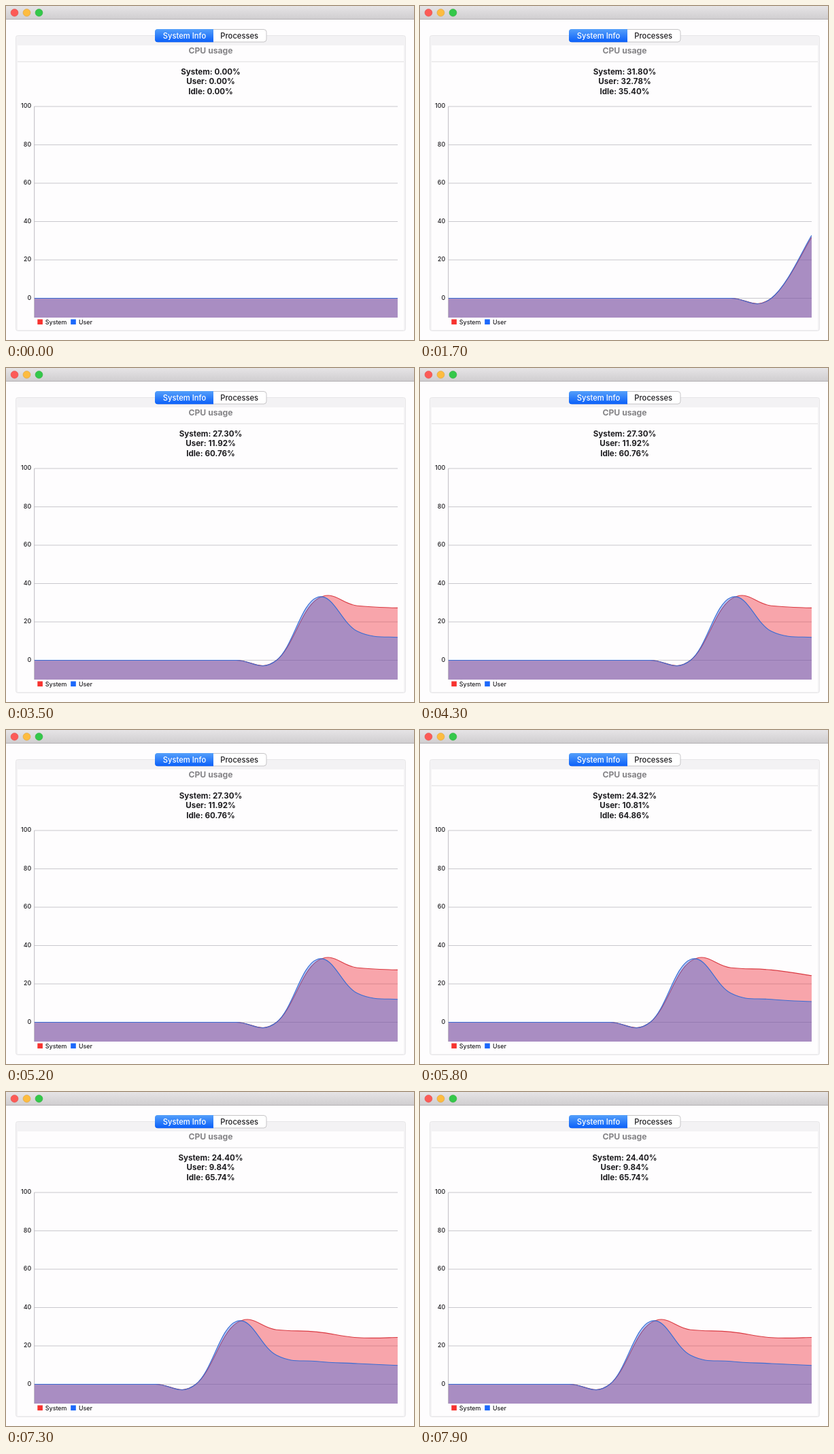
Write an HTML page that moves like this. It is 600 px wide and 492 px high and loops after 8 s.

```html
<!DOCTYPE html>
<html lang="en">
<head>
<meta charset="utf-8">
<title>CPU usage</title>
<style>
  html, body { margin: 0; width: 100%; height: 100%; overflow: hidden; background: #fefdfe; }
  svg { display: block; width: 100%; height: 100%; font-family: Inter, "Open Sans", sans-serif; }
  .mid { text-anchor: middle; }
  .tab { font-size: 11.2px; font-weight: 500; }
  .head { font-size: 12.2px; font-weight: 700; fill: #858487; }
  .stat { font-size: 11.6px; font-weight: 700; fill: #1e1d20; }
  .small { font-size: 8.9px; font-weight: 500; fill: #1e1d20; }
  .end { text-anchor: end; }
</style>
</head>
<body>
<svg viewBox="0 0 600 492">
  <defs>
    <linearGradient id="bar" x2="0" y2="1">
      <stop stop-color="#e6e4e6"/><stop offset="1" stop-color="#d0ced0"/>
    </linearGradient>
    <linearGradient id="on" x2="0" y2="1">
      <stop stop-color="#55a0fa"/><stop offset="1" stop-color="#0a5ff9"/>
    </linearGradient>
    <clipPath id="plot"><rect x="41.5" y="147" width="534.5" height="312"/></clipPath>
  </defs>

  <rect width="600" height="492" fill="#fefdfe"/>
  <rect width="600" height="19" fill="url(#bar)"/>
  <rect y="19" width="600" height="1" fill="#b3b1b3"/>
  <g stroke-width=".6">
    <circle cx="12.5" cy="9.8" r="5.4" fill="#fc5b57" stroke="#df4744"/>
    <circle cx="30.5" cy="9.8" r="5.4" fill="#fdbc40" stroke="#dd9f34"/>
    <circle cx="48.5" cy="9.8" r="5.4" fill="#34c84a" stroke="#27aa35"/>
  </g>

  <rect x="14.5" y="43.5" width="573" height="435" rx="3" fill="#f3f2f4" stroke="#e7e6e8"/>
  <rect x="17" y="58" width="568" height="419" fill="#fefdfe"/>
  <rect x="17" y="81.5" width="568" height="1" fill="#dfdee0"/>

  <rect x="219.5" y="34.5" width="163.5" height="18.5" rx="4" fill="#fff" stroke="#c6c5c7"/>
  <path d="M305 34V53.3H223a4 4 0 0 1-4-4V38a4 4 0 0 1 4-4Z" fill="url(#on)"/>
  <text class="tab mid" x="262.5" y="47.6" fill="#fff">System Info</text>
  <text class="tab mid" x="343.2" y="47.6" fill="#1e1d20">Processes</text>
  <text class="head mid" x="301" y="70.3">CPU usage</text>

  <g id="stats"></g>
  <g id="grid"></g>
  <g id="curves" clip-path="url(#plot)"></g>

  <rect x="46.3" y="461.5" width="7.6" height="7.6" fill="#f7332f"/>
  <text class="small" x="57.8" y="468.7">System</text>
  <rect x="95.2" y="461.5" width="7.6" height="7.6" fill="#1c68fb"/>
  <text class="small" x="107" y="468.7">User</text>
</svg>
<script>
const LOOP = 8000, COUNT = 10, LEFT = 41.8, STEP = 59.35, ZERO = 430.5, UNIT = 2.825, BOTTOM = 459;
const TENSION = 0.2;

// time, system, user, idle
const readings = [
  [1700, 31.80, 32.78, 35.40],
  [2600, 28.41, 15.12, 56.45],
  [3500, 27.30, 11.92, 60.76],
  [5300, 24.32, 10.81, 64.86],
  [7100, 24.40, 9.84, 65.74]
];
const labels = ['System', 'User', 'Idle'];

function add(parent, tag, attrs, text = '') {
  const el = document.createElementNS('http://www.w3.org/2000/svg', tag);
  for (const key in attrs) el.setAttribute(key, attrs[key]);
  el.textContent = text;
  return parent.appendChild(el);
}

const byId = id => document.getElementById(id);
const stats = labels.map((_, i) => add(byId('stats'), 'text', { class: 'stat mid', x: 301, y: 101 + i * 14.3 }));

for (let v = 0; v <= 100; v += 20) {
  const y = ZERO - v * UNIT;
  add(byId('grid'), 'path', { d: `M41.5 ${y}H576`, stroke: '#c9c8cd', 'stroke-width': 1.1 });
  add(byId('grid'), 'text', { class: 'small end', x: 37.2, y: y + 2.4 }, v);
}
add(byId('grid'), 'path', { d: `M41.7 148V${BOTTOM}`, stroke: '#bdbcc1' });

const series = [
  { fill: 'rgba(238,50,62,.43)', stroke: '#d93a42' },
  { fill: 'rgba(40,104,231,.38)', stroke: '#3a6cd2' }
].map(({ fill, stroke }) => ({
  area: add(byId('curves'), 'path', { fill }),
  line: add(byId('curves'), 'path', { fill: 'none', stroke, 'stroke-width': 1.1 })
}));

// Cubic curve whose handles follow the neighbours of each point
function curve(values) {
  const pts = values.map((v, i) => [LEFT + i * STEP, ZERO - v * UNIT]);
  const at = i => pts[Math.max(0, Math.min(pts.length - 1, i))];
  const handle = (i, sign) =>
    at(i).map((c, k) => (c + sign * TENSION * (at(i + 1)[k] - at(i - 1)[k])).toFixed(2));
  return pts.reduce((d, p, i) =>
    i ? `${d}C${handle(i - 1, 1)} ${handle(i, -1)} ${p}` : `M${p}`, '');
}

let shown = -1;
function draw(time) {
  const seen = readings.filter(r => r[0] <= time);
  if (seen.length === shown) return;
  shown = seen.length;
  const latest = seen[shown - 1] || [0, 0, 0, 0];
  stats.forEach((el, i) => el.textContent = `${labels[i]}: ${latest[i + 1].toFixed(2)}%`);
  series.forEach(({ area, line }, i) => {
    const values = [...Array(COUNT - shown).fill(0), ...seen.map(r => r[i + 1])];
    const d = curve(values);
    line.setAttribute('d', d);
    area.setAttribute('d', `${d}V${BOTTOM}H${LEFT}Z`);
  });
}

const start = performance.now();
function tick() {
  draw((performance.now() - start) % LOOP);
  requestAnimationFrame(tick);
}
tick();
</script>
</body>
</html>
```
